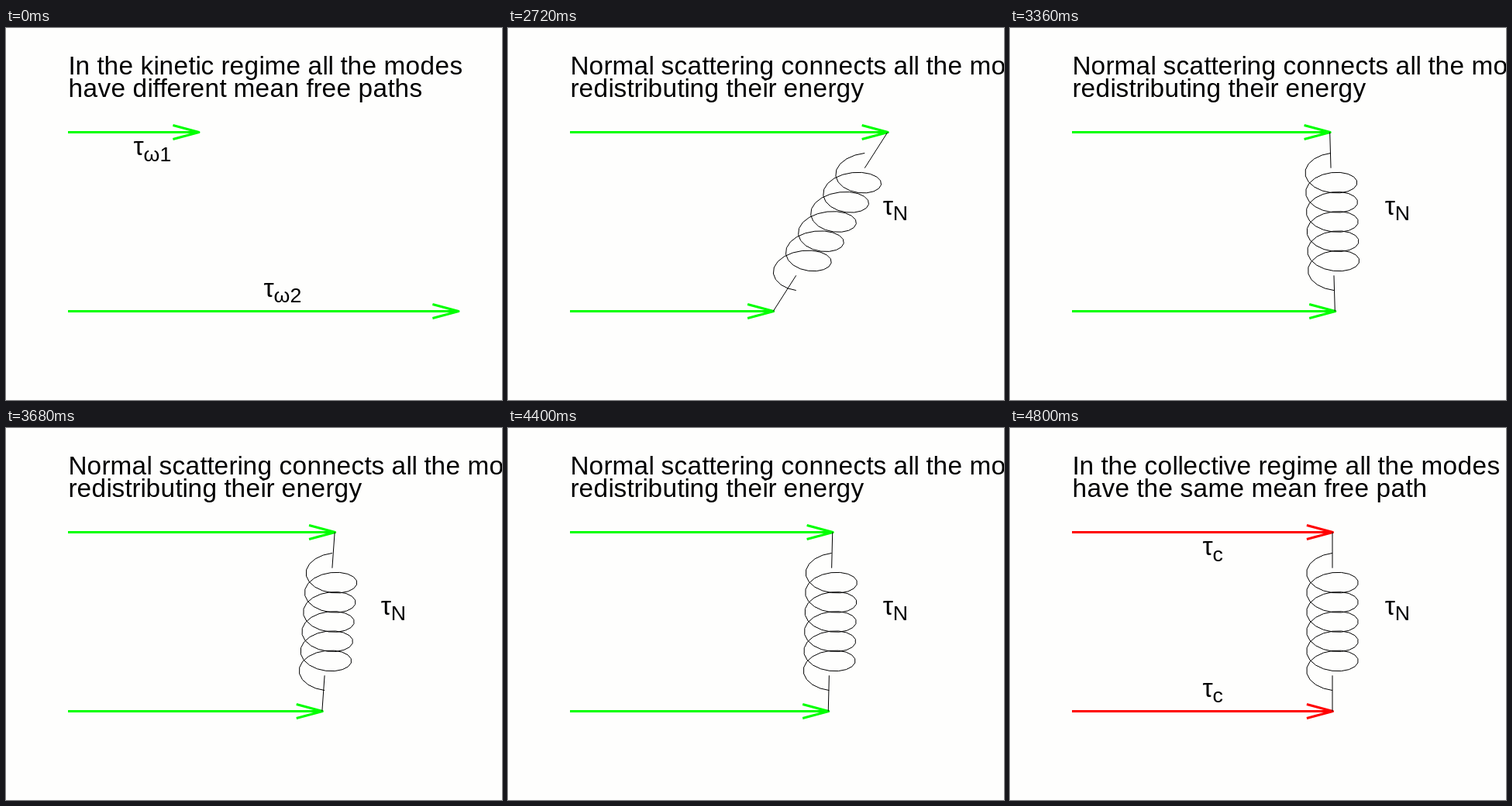
Recreate the animation shown at these times as an HTML page with a canvas. Size 640 by 480 pixels, loop 7.36 s.

```html
<!DOCTYPE html>
<html>
<head>
<meta charset="utf-8">
<style>
html, body { margin: 0; width: 100%; height: 100%; overflow: hidden; background: #fefefd; }
canvas { display: block; }
</style>
</head>
<body>
<canvas id="stage" width="640" height="480"></canvas>
<script>
const ctx = document.getElementById('stage').getContext('2d');

const LOOP = 7360, SWING_START = 2400, SWING_END = 4800, STEP = 80;
const LEFT = 80.5, UNIT = 168, TOP = 134.5, BOTTOM = 365.5;
const MIDDLE = LEFT + 2 * UNIT;
const SWING = 167.5, DAMPING = 0.162, FREQUENCY = 0.643;
const GREEN = '#00ff00', RED = '#ff0000', BLACK = '#000';
const FONT_SIZE = 100 / 3;

// Sets text with whole-pixel advances and returns the end position.
function write(text, x, y, size = FONT_SIZE) {
  ctx.font = `${size}px "Liberation Sans", Arial, sans-serif`;
  ctx.fillStyle = BLACK;
  for (const letter of text) {
    ctx.fillText(letter, x, Math.round(y));
    x += Math.round(ctx.measureText(letter).width);
  }
  return x;
}

function caption(first, second) {
  write(first, LEFT, 60);
  write(second, LEFT, 89);
}

function tau(sub, units, y) {
  const end = write('τ', LEFT + units * UNIT, y);
  write(sub, end, y + 7.5, FONT_SIZE * 0.8);
}

function stroke(points, color, width) {
  ctx.beginPath();
  points.forEach(([x, y]) => ctx.lineTo(x, y));
  ctx.strokeStyle = color;
  ctx.lineWidth = width;
  ctx.stroke();
}

function arrow(tip, y, color) {
  const back = tip - 33.6;
  stroke([[LEFT - 0.5, y], [tip, y]], color, 3);
  stroke([[back, y - 9], [tip, y], [back, y + 9]], color, 3);
}

// Coil of five and a half turns, sheared between the two arrow tips.
function spring(x1, x2) {
  const axis = s => [x1 + (x2 - x1) * s, TOP + (BOTTOM - TOP) * s];
  const coil = [];
  for (let i = 0; i <= 99; i++) {
    const angle = i * Math.PI / 9;
    const [x, y] = axis(0.2 + 0.6 * i / 99);
    coil.push([x - 33.4 * Math.sin(angle), y - 19.25 * Math.cos(angle)]);
  }
  stroke([axis(0), axis(0.2)], BLACK, 1);
  stroke(coil, BLACK, 1);
  stroke([axis(0.8), axis(1)], BLACK, 1);
}

function arrows(offset, color) {
  arrow(MIDDLE + offset, TOP, color);
  arrow(MIDDLE - offset, BOTTOM, color);
}

function coupled(offset, color) {
  const center = MIDDLE - 0.5;
  arrows(offset, color);
  spring(center + offset, center - offset);
  tau('N', 2.4, 240.5);
}

function draw(t) {
  ctx.fillStyle = '#fefefd';
  ctx.fillRect(0, 0, 640, 480);
  if (t < SWING_START) {
    caption('In the kinetic regime all the modes', 'have different mean free paths');
    arrows(-SWING, GREEN);
    tau('ω1', 0.5, 164);
    tau('ω2', 1.5, 346.5);
  } else if (t < SWING_END) {
    const k = Math.floor((t - SWING_START) / STEP);
    caption('Normal scattering connects all the modes', 'redistributing their energy');
    coupled(-SWING * Math.exp(-DAMPING * k) * Math.cos(FREQUENCY * k), GREEN);
  } else {
    caption('In the collective regime all the modes', 'have the same mean free path');
    coupled(0, RED);
    tau('c', 1, 164);
    tau('c', 1, 346.5);
  }
}

ctx.fontKerning = 'none';
ctx.lineJoin = 'round';
const start = performance.now();
function tick() {
  draw((performance.now() - start) % LOOP);
  requestAnimationFrame(tick);
}
tick();
</script>
</body>
</html>
```
